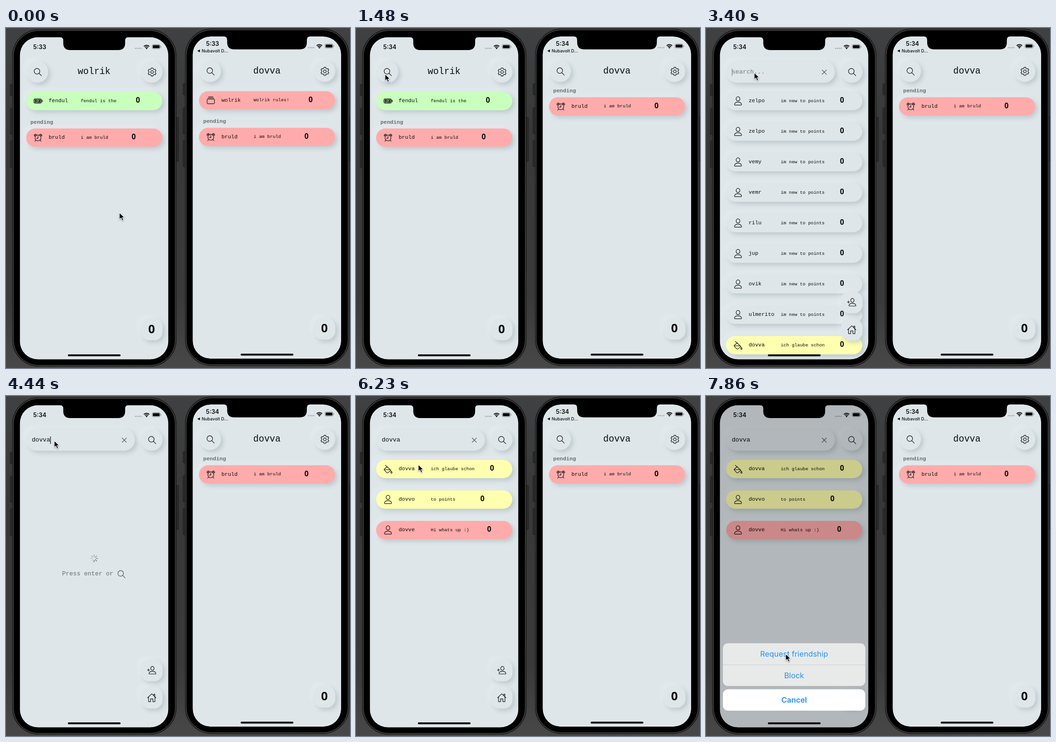
An HTML page that plays this animation: 734 px wide and 724 px high, repeating every 8 s.

```html
<!DOCTYPE html>
<html lang="en">
<head>
<meta charset="utf-8">
<title>Friend request demo</title>
<style>
  html, body { margin: 0; width: 100%; height: 100%; overflow: hidden; background: #393939; }
  svg { display: block; }
  text { fill: #0b0c0d; white-space: pre; }
  .mono { font-family: "Liberation Mono", monospace; }
  .ui { font-family: Inter, sans-serif; }
  .num { font-family: "Open Sans", sans-serif; font-weight: 700; text-anchor: middle; }
  .mid { text-anchor: middle; }
  .raised { filter: drop-shadow(5px 5px 5px #93a2aa68) drop-shadow(-9px -8px 4px #ffffff26); }
  .icon { fill: none; stroke: #131516; stroke-width: 1.2; stroke-linecap: round; stroke-linejoin: round; }
  .grey { fill: #666c70; }
  .sheet text { fill: #2492ef; text-anchor: middle; font-size: 16.3px; }
</style>
</head>
<body>
<svg id="stage" width="734" height="724" viewBox="0 0 734 724"></svg>
<script>
const LOOP = 8000, STEP = LOOP / 54;
const BG = '#dee6e9', RED = '#ffabab', GREEN = '#c8ffbc', YELLOW = '#ffffb0';
const QUERY = 'dovva';

// ---- drawing helpers ----
const rect = (x, y, w, h, r, fill, more = '') =>
  `<rect x="${x}" y="${y}" width="${w}" height="${h}" rx="${r}" fill="${fill}" ${more}/>`;
const text = (s, x, y, size, cls = 'mono', more = '') =>
  `<text x="${x}" y="${y}" font-size="${size}" class="${cls}" ${more}>${s}</text>`;
const group = (id, body, more = '') => `<g id="${id}" ${more}>${body}</g>`;
const icon = (name, x, y, more = '') =>
  `<g class="icon" transform="translate(${x} ${y})" ${more}>${ICONS[name]}</g>`;
const raised = (x, y, w, h, r, fill = BG) => rect(x, y, w, h, r, fill, 'class="raised"');
const screenRect = (fill, more) => rect(29.5, 19.5, 317, 686.2, 38.5, fill, more);

function gearPath() {
  const points = [];
  for (let tooth = 0; tooth < 6; tooth++)
    for (const [angle, r] of [[-18, 6.9], [-12, 8.9], [12, 8.9], [18, 6.9]]) {
      const a = (tooth * 60 + angle) * Math.PI / 180;
      points.push((r * Math.sin(a)).toFixed(2) + ' ' + (-r * Math.cos(a)).toFixed(2));
    }
  return `<path d="M${points.join('L')}Z"/>`;
}

const ICONS = {
  search: '<circle cx="-1.6" cy="-1.6" r="6"/><path d="M2.8 2.8L8 8"/>',
  gear: gearPath() + '<circle r="3"/>',
  close: '<path d="M-4.5-4.5L4.5 4.5M4.5-4.5L-4.5 4.5" stroke="#555b5e"/>',
  person: '<ellipse cy="-4.6" rx="4" ry="4.5"/><path d="M-7.6 7.5C-7.2 3.6-3.6 2.3 0 2.3S7.2 3.6 7.6 7.5Q7.6 8.7 6.4 8.7H-6.4Q-7.6 8.7-7.6 7.5Z"/>',
  addPerson: '<ellipse cx="1.4" cy="-4" rx="3.6" ry="4.1"/><path d="M-6 7C-5.6 3.4-2 2.3 1.4 2.3S8.4 3.4 8.8 7Q8.8 8 7.8 8H-5Q-6 8-6 7ZM-9.3-.5H-4.6M-7-2.9V1.9"/>',
  home: '<path d="M-9 .2L0-8.4 9 .2M-6.8-1.7V8.3H-2.4V2.3H2.4V8.3H6.8V-1.7M4.4-4.4V-7.7H6.6V-2.2"/>',
  battery: '<rect x="-8.5" y="-4.3" width="15.5" height="8.6" rx="2.2" stroke-width="1.4"/><path d="M9-1.6V1.6" stroke-width="1.6"/><path d="M-6-2.5H-2.4L-4.8 1H-2.8L-3.4 2.5H-6ZM4.6 2.5H1L3.4-1H1.4L2-2.5H4.6Z" fill="#131516" stroke-width=".8"/><path d="M.5-3.5L-2.2.4H.8L-1.2 3.7"/>',
  alarm: '<circle cy=".6" r="6.3"/><path d="M0-3.2V1.3H-3M-4.6 5.3L-6.6 7.7M4.6 5.3L6.6 7.7M-7.6-3.2C-9.4-6.6-5.6-8.7-3.6-6.5ZM7.6-3.2C9.4-6.6 5.6-8.7 3.6-6.5Z"/>',
  albums: '<rect x="-7.8" y="-2.8" width="15.6" height="10" rx="1.8"/><path d="M-6.3-5.1H6.3M-4.6-7.4H4.6"/>',
  bucket: '<path d="M-4.2-6.6L6.2 2.8-.5 8.1Q-1.5 8.8-2.5 7.8L-8 2.1Q-8.7 1.2-7.9.3L-1.3-5.2M-7.5 1.2L4.6 1.4M-4.2-6.6L-5.5-8"/><path d="M7.2 4.6C9.7 7.5 8.5 9 7.2 9S4.9 7.5 7.2 4.6Z"/>'
};

function row(y, iconName, name, note, fill = BG) {
  return raised(43, y, 290.5, 39, 19.5, fill) +
    icon(iconName, 68.3, y + 19.5) +
    text(name, 91, y + 22, 11.45) +
    text(note, 159.5, y + 21.5, 9.75) +
    text('0', 243.3 + 2.925 * note.length, y + 23.3, 15.5, 'num');
}

const roundButton = (x, y, name) => raised(x, y, 46, 46, 23) + icon(name, x + 23.7, y + 23.2);
const cornerButton = (y, content) => raised(288, y, 46, 46, 18) + content;

function homeView(title, firstRow, pendingId) {
  return roundButton(44, 70.5, 'search') + roundButton(288, 70.5, 'gear') +
    text(title, 188, 98, 19.4, 'mono mid') +
    group(pendingId + 'First', firstRow) +
    group(pendingId, text('pending', 52, 203.7, 11.6, 'mono grey', 'font-weight="700"') +
      row(214, 'alarm', 'bruld', 'i am bruld', RED)) +
    cornerButton(619, text('0', 310.6, 649.5, 25, 'num'));
}

function spinner(id, y) {
  let spokes = '';
  for (let i = 0; i < 8; i++)
    spokes += `<path d="M0-3.8V-7.6" stroke="#666c70" stroke-width="1.6" stroke-linecap="round" transform="rotate(${i * 45})"/>`;
  return group(id, spokes, `transform="translate(188 ${y})"`);
}

function searchView() {
  const names = ['zelpo', 'zelpo', 'vemy', 'vemr', 'rilu', 'jup', 'ovik', 'ulmerito'];
  const people = names.map((n, i) => row(136 + 65 * i, 'person', n, 'im new to points')).join('') +
    row(656, 'bucket', QUERY, 'ich glaube schon', YELLOW);
  return group('people', people) +
    group('results',
      group('picked', row(136, 'bucket', QUERY, 'ich glaube schon', YELLOW)) +
      row(201, 'person', 'dovvo', 'to points', YELLOW) +
      row(266, 'person', 'dovve', 'Hi whats up :)', RED)) +
    group('waiting', spinner('spin1', 346) + spinner('spin2', 413.5) +
      text('Press enter or', 119.7, 382.3, 13, 'mono grey') + icon('search', 246.3, 379.3, 'opacity=".7"')) +
    raised(43, 70.5, 232, 46, 23) +
    text('', 55, 97.3, 13.1, 'mono', 'id="input"') +
    rect(55, 86, 1.3, 16, 0, '#15181a', 'id="caret"') +
    icon('close', 252.3, 94) + roundButton(288, 70.5, 'search') +
    cornerButton(561.5, icon('addPerson', 311, 584)) + cornerButton(619.5, icon('home', 311, 642.5));
}

const sheet = () =>
  rect(36, 526.5, 304, 91, 11, '#e8eae9') +
  rect(36, 572, 304, 0.8, 0, '#c3c7c8') +
  rect(36, 624.5, 304, 45.5, 11, '#fff') +
  text('Request friendship', 188, 555, 16.3, 'ui') +
  text('Block', 188, 601, 16.3, 'ui') +
  text('Cancel', 188, 653, 16.3, 'ui', 'font-weight="600"');

function statusBar(clockId, clockY) {
  const dots = [0, 1, 2, 3].map(i => `<circle cx="${276.7 + 3.8 * i}" cy="43.3" r="1.4" fill="#a7aeb2"/>`).join('');
  const arc = (r, w) => {
    const d = r * Math.SQRT1_2;
    return `<path d="M${300 - d} ${45 - d}A${r} ${r} 0 0 1 ${300 + d} ${45 - d}" fill="none" stroke="#0b0c0d" stroke-width="${w}"/>`;
  };
  return text('', 72, clockY, 12.6, 'ui mid', `id="${clockId}" font-weight="600"`) + dots +
    arc(8.3, 2) + arc(5.1, 1.9) + '<path d="M300 45.2L297.8 43A3.1 3.1 0 0 1 302.2 43Z"/>' +
    rect(311.8, 35.2, 17.4, 9.2, 2.8, 'none', 'stroke="#7d8487" stroke-width=".9"') +
    rect(313.2, 36.6, 14.6, 6.4, 1.5, '#08090a') + rect(330, 38.3, 1.2, 3, 0.6, '#7d8487');
}

const button = (x, y, h) => rect(x, y, 5, h, 1.5, '#2b2b2b', 'stroke="#1c1c1c" stroke-width=".8"');

function notch(width) {
  const left = 188.2 - width / 2, right = 188.2 + width / 2;
  return `<path d="M${left - 7} 18V19.5Q${left} 19.5 ${left} 27V32Q${left} 47 ${left + 15} 47` +
    `H${right - 15}Q${right} 47 ${right} 32V27Q${right} 19.5 ${right + 7} 19.5V18Z"/>`;
}

function phone(x, y, notchWidth, screen) {
  return `<g transform="translate(${x} ${y})">` +
    button(9, 120, 24) + button(9, 171, 56) + button(9, 240, 57) + button(363, 190, 94) +
    rect(14.2, 3.8, 348.6, 716.2, 56, '#1c1c1c', 'stroke="#0e0e0e" stroke-width="1.6"') +
    rect(15.2, 4.8, 346.6, 714.2, 55, '#1c1c1c', 'stroke="#5a5b5d" stroke-width="1"') +
    rect(17, 6.6, 343, 710.6, 53, '#000') +
    `<g clip-path="url(#screen)">${screenRect(BG)}${screen}</g>` +
    notch(notchWidth) + rect(132, 695, 112.5, 4, 2, '#000') + '</g>';
}

const stage = document.getElementById('stage');
stage.innerHTML =
  `<defs><clipPath id="screen">${screenRect('#000')}</clipPath>
   <linearGradient id="desk" x2="0" y2="1"><stop stop-color="#404142"/><stop offset=".3" stop-color="#383838"/>
   <stop offset=".8" stop-color="#3a3a3a"/><stop offset="1" stop-color="#484848"/></linearGradient></defs>` +
  rect(0, 0, 734, 724, 0, 'url(#desk)') +
  phone(368.7, -1.4, 170,
    statusBar('clock2', 39) + '<path d="M39.5 50.2L45 47.2V53.2Z"/>' +
    text('Nubavolt D...', 48.8, 53.4, 9.1, 'ui', 'font-weight="500"') +
    homeView(QUERY, row(136, 'albums', 'wolrik', 'Wolrik rules!', RED), 'right')) +
  phone(0, 0, 132,
    group('home', homeView('wolrik', row(136, 'battery', 'fendul', 'fendul is the', GREEN), 'left')) +
    group('search', searchView()) + statusBar('clock1', 44.5) +
    screenRect('#000', 'id="dim"') + group('sheet', sheet(), 'class="sheet"')) +
  group('cursor', '<path d="M0 0V14.6L3.5 11.4 6 17.2 8.7 16 6.2 10.5H10.8Z" stroke="#fff" stroke-width="1.1" stroke-linejoin="round"/>',
    'style="filter:drop-shadow(0 1px 1px #0006)"');

const $ = id => document.getElementById(id);
const show = (id, opacity) => {
  $(id).style.opacity = opacity;
  $(id).style.display = opacity > 0 ? '' : 'none';
};
const move = (id, transform) => $(id).setAttribute('transform', transform);
const ramp = (k, from, to) => Math.min(1, Math.max(0, (k - from) / (to - from)));

const CURSOR = [
  [0, 242, 393], [1, 238, 385], [3, 185, 300], [6, 85, 145], [8, 66, 109], [10, 62, 98],
  [12, 62, 98], [15, 103, 95], [40, 103, 95], [42, 133, 146], [44, 133, 146],
  [45, 138, 148], [47, 146, 250], [50, 168, 510], [52, 170, 551], [53, 170, 549]
];
const TYPED_AT = [24, 25, 27, 28, 29];

function cursorAt(k) {
  const i = Math.max(1, CURSOR.findIndex(p => p[0] >= k));
  const [a, b] = [CURSOR[i - 1], CURSOR[i]];
  const u = ramp(k, a[0], b[0]);
  return [a[1] + (b[1] - a[1]) * u, a[2] + (b[2] - a[2]) * u];
}

function caretOpacity(k) {
  if (k < 18) return 1;
  if (k < 23) return 0;
  if (k === 23) return 0.4;
  return k < 33 ? 1 : 0;
}

function spin(id, k) {
  [...$(id).children].forEach((spoke, i) =>
    spoke.setAttribute('opacity', 0.2 + 0.1 * ((i - k + 57) % 8)));
}

function draw(t) {
  const k = Math.min(53, Math.floor((t + 10) / STEP));

  move('cursor', `translate(${cursorAt(k)})`);
  $('clock1').textContent = $('clock2').textContent = k < 3 ? '5:33' : '5:34';

  const removed = ramp(k, 3, 6);
  show('rightFirst', 1 - removed);
  move('right', `translate(0 ${-65 * removed})`);

  const opened = ramp(k, 11, 14);
  show('home', 1 - opened);
  show('search', opened);

  const typed = QUERY.slice(0, TYPED_AT.filter(at => at <= k).length);
  const input = $('input');
  input.textContent = typed || 'search...';
  input.style.fill = typed ? '' : '#747b7f';
  $('caret').setAttribute('x', 55 + 7.86 * typed.length);
  show('caret', caretOpacity(k));

  const found = k < 38 ? 0 : k === 38 ? 0.45 : 1;
  show('people', typed ? 0 : 1);
  show('waiting', !typed || found === 1 ? 0 : found ? 0.38 : 1);
  show('results', found);
  show('spin2', k < 33 ? 0 : 1);
  spin('spin1', k);
  spin('spin2', k);

  move('picked', k === 45 ? 'translate(188.2 155.5) scale(.994) translate(-188.2 -155.5)' : '');
  show('dim', k < 45 ? 0 : 0.205);
  show('sheet', k < 45 ? 0 : 1);
  move('sheet', `translate(0 ${k === 45 ? 10 : 0})`);
}

const start = performance.now();
function tick() {
  draw((performance.now() - start) % LOOP);
  requestAnimationFrame(tick);
}
tick();
</script>
</body>
</html>
```
